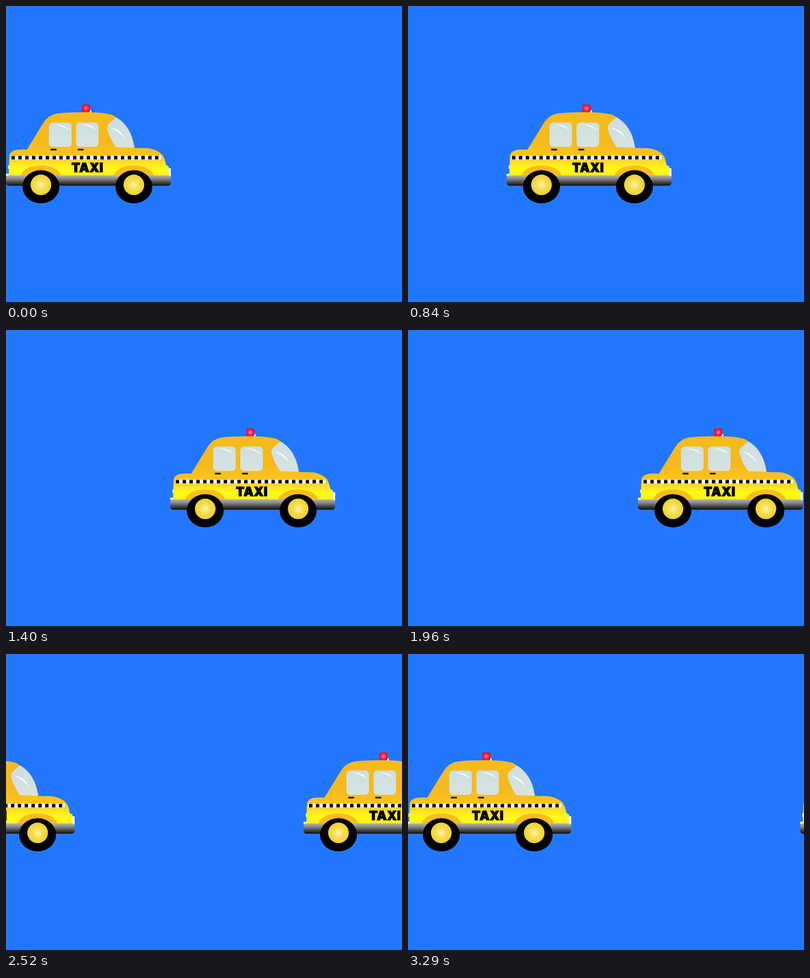
Animation, 720 px wide and 540 px high, one loop 3.36 s. Source, as an HTML page:

```html
<!DOCTYPE html>
<html lang="en">
<head>
<meta charset="utf-8">
<title>Taxi</title>
<style>
  html, body { margin: 0; width: 100%; height: 100%; overflow: hidden; background: #2277ff; }
  svg { display: block; width: 720px; height: 540px; }
</style>
</head>
<body>
<svg viewBox="0 0 720 540">
  <defs>
    <linearGradient id="paint" gradientUnits="userSpaceOnUse" x1="0" y1="194" x2="0" y2="309">
      <stop offset="0" stop-color="#f4bb1c"/>
      <stop offset=".45" stop-color="#f6b91b"/>
      <stop offset=".7" stop-color="#fcc522"/>
      <stop offset=".78" stop-color="#ffdc28"/>
      <stop offset=".9" stop-color="#fffb12"/>
      <stop offset="1" stop-color="#ffee20"/>
    </linearGradient>
    <linearGradient id="chrome" x1="0" y1="0" x2="0" y2="1">
      <stop offset="0" stop-color="#b4b4b4"/>
      <stop offset=".3" stop-color="#8c8c8c"/>
      <stop offset="1" stop-color="#0c0c0c"/>
    </linearGradient>
    <linearGradient id="glass" x1="0" y1="0" x2="0" y2="1">
      <stop offset="0" stop-color="#cddfe0"/>
      <stop offset="1" stop-color="#d6e3e1"/>
    </linearGradient>
    <radialGradient id="hub">
      <stop offset="0" stop-color="#fff3a8"/>
      <stop offset=".5" stop-color="#f6dd55"/>
      <stop offset="1" stop-color="#eed22c"/>
    </radialGradient>
    <radialGradient id="lamp">
      <stop offset="0" stop-color="#ffa0a8"/>
      <stop offset=".5" stop-color="#f8344a"/>
      <stop offset="1" stop-color="#ea0820"/>
    </radialGradient>

    <g id="window">
      <rect x="78" y="212.5" width="41" height="44.5" rx="7" fill="url(#glass)"/>
      <path d="M88 216Q105 215 116 227Q104 219 88 216Z" fill="#fff"/>
      <rect x="81" y="260.5" width="11" height="3" rx="1.2" fill="#16110a"/>
    </g>
    <g id="wheel">
      <path d="M27 309Q35 291 63.5 291Q92 291 100 309Z" fill="#f6bd1e"/>
      <ellipse cx="63.5" cy="329.7" rx="33.5" ry="30.3"/>
      <circle cx="63.5" cy="326.3" r="18.8" fill="url(#hub)"/>
    </g>

    <g id="car">
      <path d="M0 306H5V310H0ZM4 291H7V297H4ZM295 296H299.7V311H295ZM151 190H155V194H151Z" fill="#fff"/>
      <rect x="138" y="179.5" width="15" height="14.5" rx="4" fill="url(#lamp)"/>
      <path fill="url(#paint)" d="M5 310L6 275Q6 267 14 264Q20 261 38 262L68 213Q77 199 93 196
        Q110 194 130 194Q165 193 186 197Q194 198 200 203Q228 219 234 259L258 259.5Q271 261 279 267
        Q287 272 289 282L291 290L296 293V310Z"/>
      <rect x="9" y="273" width="273" height="7" fill="#fff"/>
      <path d="M10 276.6H278" stroke="#000" stroke-width="6.2" stroke-dasharray="6.2 6.23"/>
      <use href="#window"/>
      <use href="#window" x="49.3"/>
      <path d="M200 203Q228 219 233 258.5L200 257.5Q189 242 184 224Q183 219 187 215Z" fill="url(#glass)"/>
      <path d="M190 222Q208 224 216 242Q206 229 190 222Z" fill="#fff"/>
      <rect x="0" y="309" width="299.7" height="18.7" rx="5" fill="url(#chrome)"/>
      <use href="#wheel"/>
      <use href="#wheel" x="169"/>
      <text x="148.3" y="302.6" text-anchor="middle" font-family="Inter, Roboto, sans-serif"
        font-weight="900" font-size="22.5" letter-spacing=".6" stroke="#000" stroke-width="1.2">TAXI</text>
    </g>
  </defs>
  <rect width="720" height="540" fill="#2277ff"/>
  <use id="lead" href="#car"/>
  <use id="wrapped" href="#car"/>
</svg>
<script>
  const LOOP = 3360, STEP = 70, SPAN = 716;
  // [step, x]: steady drive, slightly faster while crossing the edge
  const path = [[0, 0], [28, 418.2], [36, 541], [47, 713]];
  const lead = document.getElementById('lead');
  const wrapped = document.getElementById('wrapped');

  function position(step) {
    const i = path.findIndex(([end]) => step <= end) || 1;
    const [s0, x0] = path[i - 1], [s1, x1] = path[i];
    return x0 + (x1 - x0) * (step - s0) / (s1 - s0);
  }

  function draw(now) {
    const x = position(Math.floor((now % LOOP) / STEP));
    lead.setAttribute('x', x);
    wrapped.setAttribute('x', x - SPAN);
    wrapped.setAttribute('visibility', x > 420 ? 'visible' : 'hidden');
  }

  function tick() {
    draw(performance.now());
    requestAnimationFrame(tick);
  }
  tick();
</script>
</body>
</html>
```
